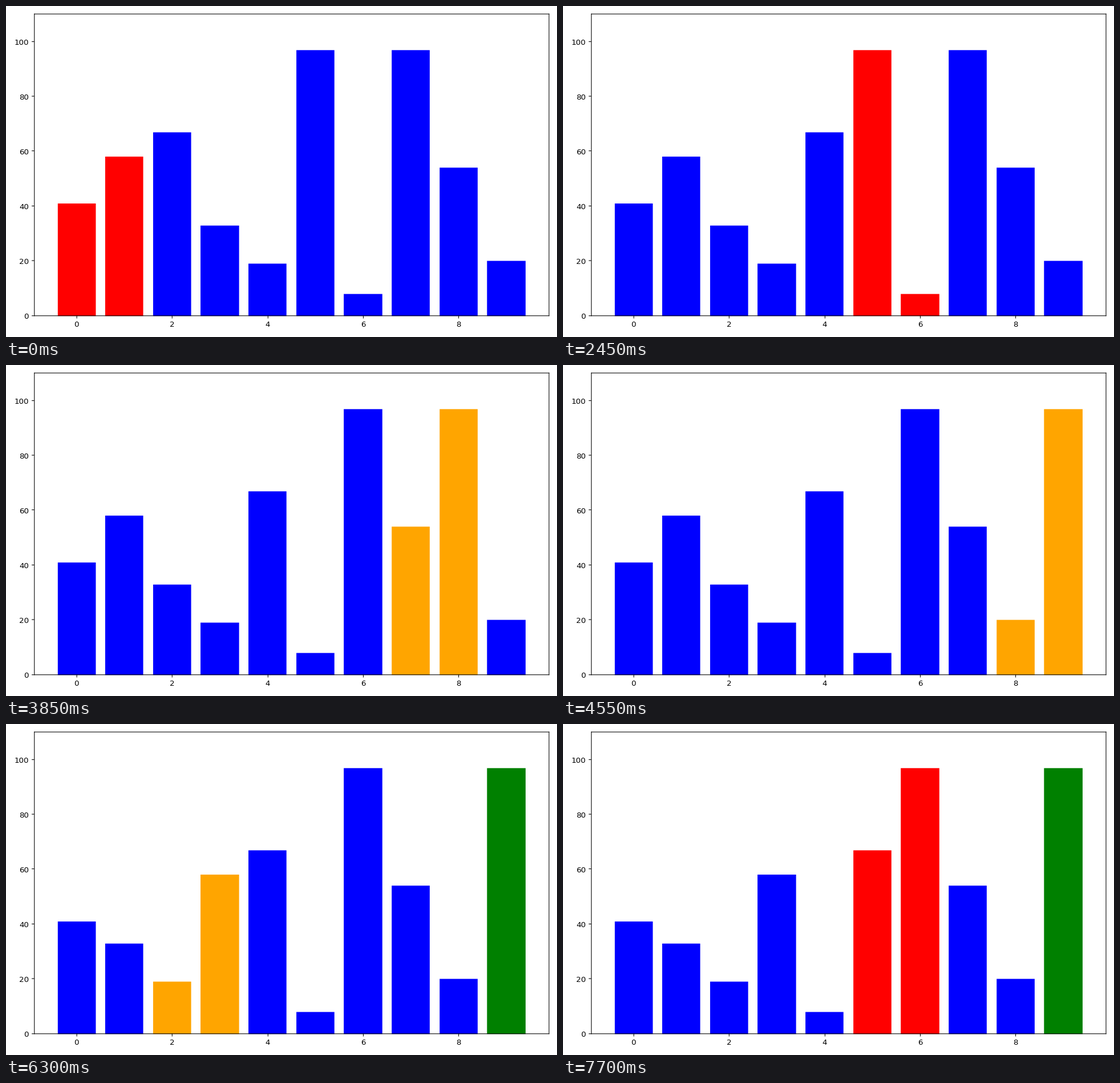
These frames come from a looping animation (966x580 px, 8000 ms). A matplotlib script:

```python
import itertools

import matplotlib.pyplot as plt
import numpy as np
from matplotlib.animation import FuncAnimation

STAGE_W, STAGE_H, DPI = 966, 580, 100
SCALE = STAGE_W / 1000          # layout is set on a 1000 x 600 grid
LEFT, RIGHT, BOTTOM, TOP = 51.05, 985, 38.4, 585
X_MIN, X_MAX, Y_MAX = -0.89, 9.89, 110
TICK, LABEL_GAP = 4.86, 9.72

VALUES = [41, 58, 67, 33, 19, 97, 8, 97, 54, 20]
INTERVAL, LOOP, HOLD = 50, 8000, 350


def grid_x(x):
    return LEFT + (x - X_MIN) * (RIGHT - LEFT) / (X_MAX - X_MIN)


def grid_y(y):
    return BOTTOM + y * (TOP - BOTTOM) / Y_MAX


def snap(v):
    return np.floor(v + 0.5)


def bubble_sort(values):
    """Yield (heights, colours) for every comparison and every swap."""
    a, n = list(values), len(values)

    def view(end, j, colour):
        colours = ["blue"] * end + ["green"] * (n - end)
        colours[j] = colours[j + 1] = colour
        return list(a), colours

    for end in range(n, 1, -1):
        for j in range(end - 1):
            yield view(end, j, "red")
            if a[j] > a[j + 1]:
                a[j], a[j + 1] = a[j + 1], a[j]
                yield view(end, j, "orange")


fig = plt.figure(figsize=(STAGE_W / DPI, STAGE_H / DPI), dpi=DPI, facecolor="white")
ax = fig.add_axes([0, 0, 1, 1])
ax.set_xlim(0, 1000)
ax.set_ylim(0, 600)
ax.axis("off")


def rule(xs, ys, cap="butt"):
    ax.plot(xs, ys, color="black", lw=0.8 * SCALE, snap=False,
            solid_capstyle=cap, zorder=2.5)


def label(x, y, text, ha, va):
    ax.text(x, y, text, ha=ha, va=va, fontsize=10 * SCALE,
            family="DejaVu Sans", color="black")


# Frame
x0, x1, y0, y1 = (snap(v) + 0.5 for v in (LEFT, RIGHT, BOTTOM, TOP))
for x in (x0, x1):
    rule([x, x], [y0, y1], "projecting")
for y in (y0, y1):
    rule([x0, x1], [y, y], "projecting")

# Ticks
for v in range(0, 10, 2):
    x = grid_x(v)
    rule([snap(x) + 0.5] * 2, [y0, y0 - TICK])
    label(x, BOTTOM - LABEL_GAP, str(v), "center", "top")
for v in range(0, 101, 20):
    y = grid_y(v)
    rule([x0, x0 - TICK], [snap(y) + 0.5] * 2)
    label(LEFT - LABEL_GAP, y, str(v), "right", "center_baseline")

# Bars
index = np.arange(len(VALUES))
lows, highs = snap(grid_x(index - 0.4)), snap(grid_x(index + 0.4))
base = snap(BOTTOM)
bars = ax.bar(lows, np.zeros(len(VALUES)), highs - lows, bottom=base,
              align="edge", linewidth=0, snap=False, zorder=1)
ax.set_xlim(0, 1000)
ax.set_ylim(0, 600)

steps = list(itertools.islice(bubble_sort(VALUES), -(-LOOP // HOLD)))


def draw(i):
    heights, colours = steps[i * INTERVAL // HOLD]
    for bar, height, colour in zip(bars, heights, colours):
        bar.set_height(snap(grid_y(height)) - base)
        bar.set_facecolor(colour)
    return bars


anim = FuncAnimation(fig, draw, frames=LOOP // INTERVAL, interval=INTERVAL,
                     repeat=True, repeat_delay=0, blit=False)
plt.show()
```
